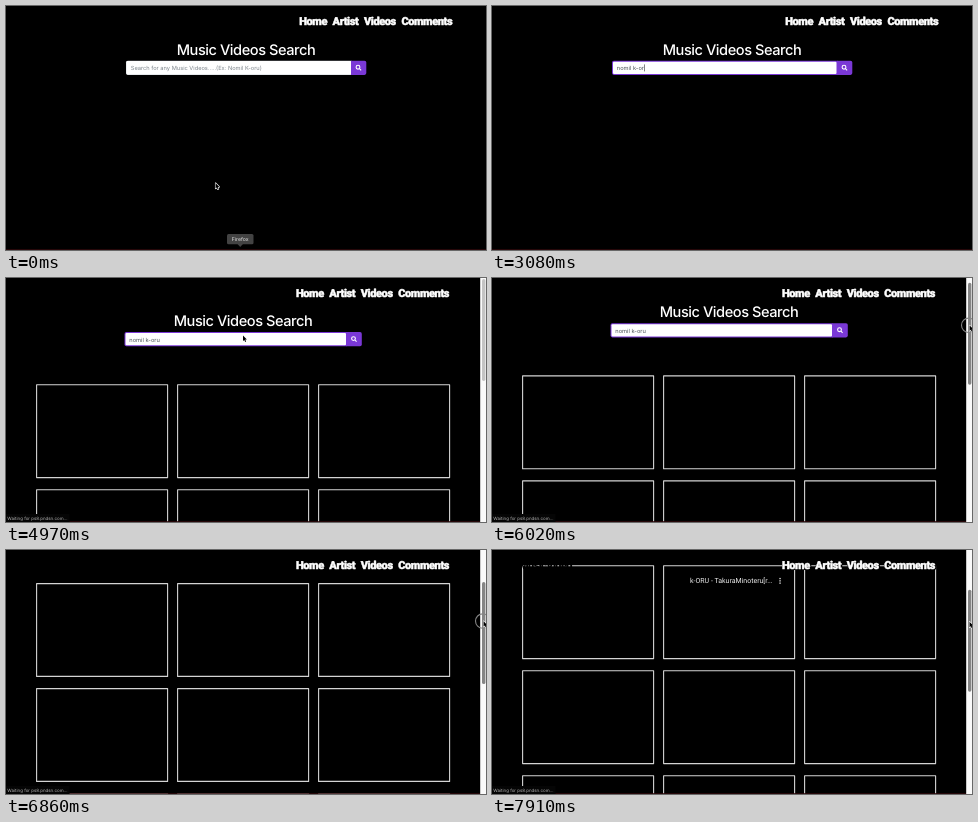
Animation of 480x244 px, one loop 8 s. Source, as an HTML page with a canvas:

```html
<!DOCTYPE html>
<html lang="en">
<head>
<meta charset="utf-8">
<title>Music Videos Search</title>
<style>
  html, body { margin: 0; width: 100%; height: 100%; overflow: hidden; background: #000; }
  canvas { display: block; width: 480px; height: 244px; }
</style>
</head>
<body>
<canvas id="stage"></canvas>
<script>
const W = 480, H = 244, LOOP = 8000, TICK = 70;
const UI = 'Inter, "Liberation Sans", sans-serif';
const NAV = '900 11px Roboto, "Open Sans", sans-serif';
const PURPLE = '#7a38d6';
const QUERY = 'nomil k-oru';
// Moments of the story, in ms
const FOCUS = 840, TYPE_ARTIST = 1190, TYPE_SONG = 2030, TYPE_LAST = 3640, BLINK = 4410;
const RESULTS = 4760, GRAB = 5670, DRAG = 5740, RELEASE = 7530, CARD_TITLE = 7840;

const canvas = document.getElementById('stage');
const ctx = canvas.getContext('2d');
const dpr = window.devicePixelRatio || 1;
canvas.width = W * dpr;
canvas.height = H * dpr;
ctx.textRendering = 'geometricPrecision';

const glide = (t, from, to) => Math.min(1, Math.max(0, (t - from) / (to - from)));
const mix = (a, b, k) => a + (b - a) * k;

// One long accelerating drag, a short nudge, then a slow tail
function scrollAt(t) {
  return 66 * glide(t, DRAG, 6650) ** 1.7 + 7.2 * glide(t, 6790, 6860) + 17.8 * glide(t, 7000, 7560);
}

function typedAt(t) {
  if (t < TYPE_ARTIST) return '';
  const artist = Math.min(6, 1 + Math.floor((t - TYPE_ARTIST) / 168));
  const song = Math.min(4, Math.max(0, Math.floor((t - TYPE_SONG) / 260)));
  return QUERY.slice(0, artist + song + (t >= TYPE_LAST));
}

// An arc up past the field and back on to it; later across to the scrollbar
function mouseAt(t, scroll) {
  if (t < TYPE_ARTIST) {
    const k = glide(t, 0, FOCUS);
    return [mix(209.5, 237, k), mix(mix(177, -74, k), mix(-74, 61, k), k)];
  }
  const k = glide(t, 5040, GRAB);
  return [mix(237, 477.5, k), mix(57.5, 44, k) + 0.37 * Math.min(scroll, 75)];
}

function rect(x, y, w, h, color) {
  ctx.fillStyle = color;
  ctx.fillRect(x, y, w, h);
}

function round(x, y, w, h, r, color) {
  ctx.fillStyle = color;
  ctx.beginPath();
  ctx.roundRect(x, y, w, h, r);
  ctx.fill();
}

function ring(x, y, r, width, color) {
  ctx.strokeStyle = color;
  ctx.lineWidth = width;
  ctx.beginPath();
  ctx.arc(x, y, r, 0, Math.PI * 2);
  ctx.stroke();
}

function setFont(font, align = 'left', spacing = 0) {
  ctx.font = font;
  ctx.textAlign = align;
  ctx.letterSpacing = spacing + 'px';
}

function text(str, x, y, font, color, align, spacing) {
  setFont(font, align, spacing);
  ctx.fillStyle = color;
  ctx.fillText(str, x, y);
}

function drawSearch(t, pageW, dy) {
  const left = pageW / 4, right = pageW * 0.75;
  const split = right - 15, top = 55 + dy, focused = t >= FOCUS;
  text('Music Videos Search', pageW / 2, 48.5 + dy, '500 14.6px ' + UI, '#fff', 'center', -0.45);

  const edge = focused ? 1 : 0.4;
  round(left, top - 0.3, split - left + 0.5, 14.2, [1.8, 0, 0, 1.8], focused ? PURPLE : '#ced4da');
  round(left + edge, top - 0.3 + edge, split - left - edge * 2 + 0.5, 14.2 - edge * 2, 1, '#fff');
  round(split, top - 0.3, 15.3, 14.2, [0, 1.8, 1.8, 0], PURPLE);

  ring(split + 7, top + 6.2, 1.9, 1.1, '#fff');
  ctx.beginPath();
  ctx.moveTo(split + 8.5, top + 7.7);
  ctx.lineTo(split + 10.1, top + 9.3);
  ctx.stroke();

  const typed = typedAt(t), x = left + 4.8, base = top + 9.1, font = '5.7px ' + UI;
  if (typed) text(typed, x, base, font, '#495057');
  else text('Search for any Music Videos.....(Ex: Nomil K-oru)', x, base, font, '#7c848b');

  const caret = t < 3850 || (t >= BLINK && (t - BLINK) % 1000 < 500);
  if (focused && caret) {
    rect(x + (typed && ctx.measureText(typed).width) + 0.2, top + 3.4, 0.6, 7, '#333');
  }
}

function drawCards(t, scroll) {
  ctx.strokeStyle = '#d4d4d4';
  ctx.lineWidth = 1.1;
  for (let row = 0; row < 4; row++)
    for (let col = 0; col < 3; col++)
      ctx.strokeRect(30.6 + col * 141, 106.8 - scroll + row * 105, 131, 92.8);

  if (t < CARD_TITLE) return;
  const y = 124.2 - scroll;
  text('k-ORU - TakuraMinoteru[r...', 198, y, '7px Roboto, sans-serif', '#eee');
  for (let i = 0; i < 3; i++) rect(287.4, y - 5.3 + i * 2.3, 1.3, 1.3, '#eee');
}

function drawNav(pageW) {
  ctx.lineJoin = 'round';
  text('MusicVideo', 27, 19, NAV, '#000', 'left', -0.6);
  setFont(NAV, 'left', -0.4);
  let x = pageW < W ? 443 : 446.2;
  for (const label of ['Comments', 'Videos', 'Artist', 'Home']) {
    x -= ctx.measureText(label).width;
    ctx.strokeStyle = '#000';
    ctx.lineWidth = 2.2;
    ctx.strokeText(label, x + 0.4, 19);
    ctx.strokeStyle = ctx.fillStyle = '#fff';
    ctx.lineWidth = 0.5;
    ctx.strokeText(label, x, 18.7);
    ctx.fillText(label, x, 18.7);
    x -= 5.6;
  }
}

function drawScrollbar(scroll, held) {
  rect(474.2, 0, 5.8, H, '#fafafa');
  round(476, 1 + scroll * 0.425, 3.4, 102, 1.7, held ? '#858585' : '#c4c4c4');
}

function drawStatus() {
  rect(0, 236, 63.5, 8, '#050505');
  text('Waiting for ps8.pndsn.com...', 1.3, 241.8, '4.45px ' + UI, '#b4b4b4');
}

function drawTooltip() {
  round(221, 228, 26.5, 10.2, 1.5, '#434343');
  ctx.fill(new Path2D('M231.5 238H237L234.2 241Z'));
  text('Firefox', 234.2, 235, '5.2px ' + UI, '#e4e4e4', 'center');
}

function drawMouse([x, y], pressed) {
  if (pressed) ring(x - 0.8, y, 7.2, 1.1, '#858585');
  const arrow = new Path2D('M0 0V5.6L1.3 4.4L2.2 6.4L3.1 6L2.2 4.1L3.9 4Z');
  ctx.save();
  ctx.translate(x, y);
  ctx.strokeStyle = '#fff';
  ctx.lineWidth = 1.1;
  ctx.stroke(arrow);
  ctx.fillStyle = '#000';
  ctx.fill(arrow);
  ctx.restore();
}

function draw(t) {
  const results = t >= RESULTS;
  const pageW = results ? 474 : W;
  const scroll = scrollAt(t);
  ctx.setTransform(dpr, 0, 0, dpr, 0, 0);
  rect(0, 0, W, H, '#000');
  drawSearch(t, pageW, results ? -0.6 - scroll : 0);
  if (results) drawCards(t, scroll);
  drawNav(pageW);
  rect(0, 243.2, W, 0.8, '#30090c');
  if (results) {
    drawScrollbar(scroll, t >= GRAB);
    drawStatus();
  }
  if (t < 140) drawTooltip();
  if (t < TYPE_ARTIST || results) drawMouse(mouseAt(t, scroll), t > DRAG && t < RELEASE);
}

const start = performance.now();
function tick() {
  const t = (performance.now() - start) % LOOP;
  draw(Math.floor(t / TICK) * TICK);
  requestAnimationFrame(tick);
}
tick();
</script>
</body>
</html>
```
